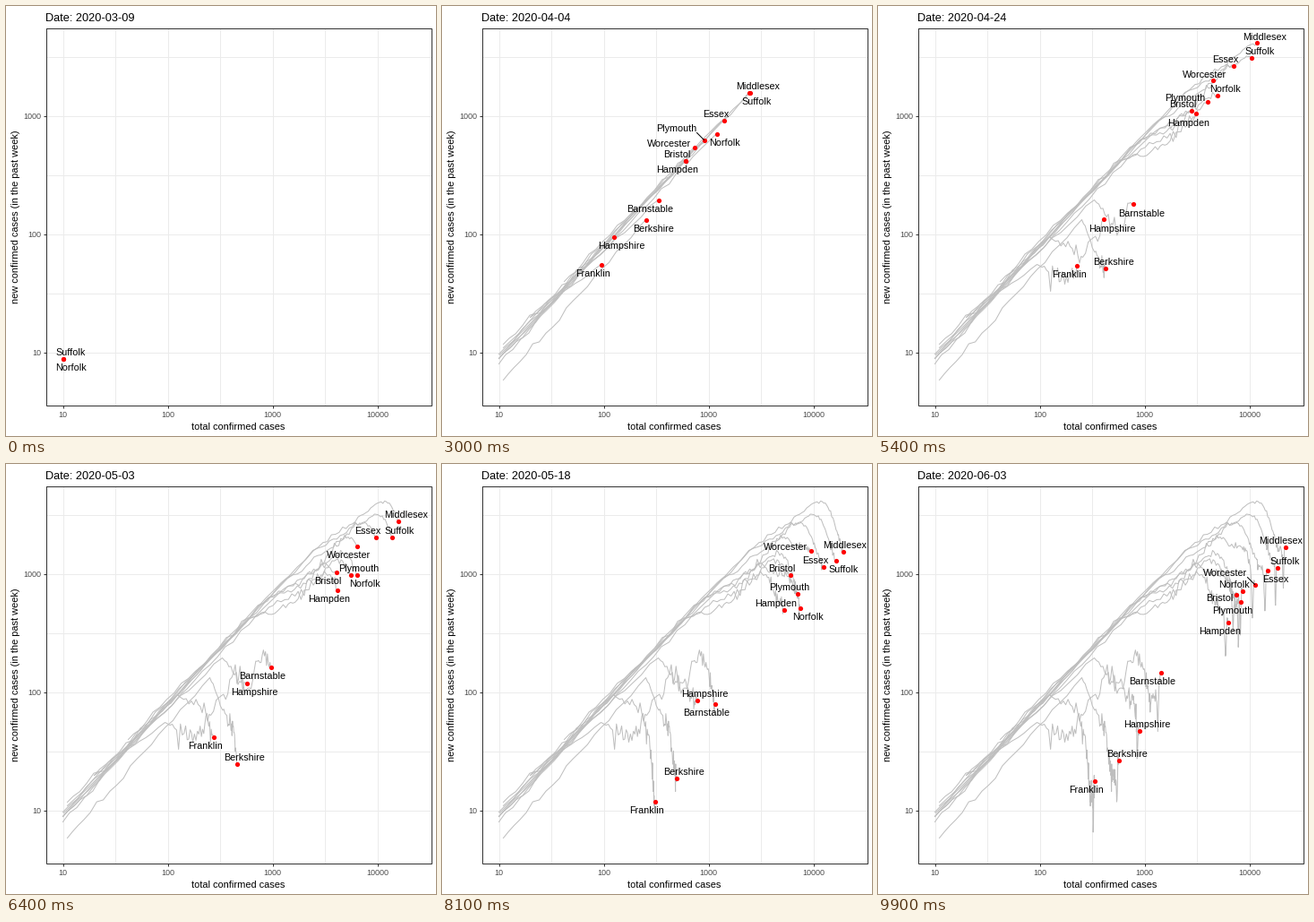
Animation, 480 px wide and 480 px high, one loop 10000 ms. Source, as a matplotlib script:

```python
from itertools import product

import numpy as np
import matplotlib.pyplot as plt
from matplotlib.animation import FuncAnimation

FRAMES, DAYS = 100, 86
KEYS = [30, 45, 64, 81, 99]          # ticks at which each county's place is known
PT = 0.75                            # points per pixel at 96 dpi
FAMILY = "Liberation Sans"

rng = np.random.default_rng(4)
fig = plt.figure(figsize=(5, 5), dpi=96, facecolor="white")
ax = fig.add_axes([0, 0, 1, 1])
ax.set(xlim=(0, 480), ylim=(480, 0))
ax.axis("off")


def text(x, y, s, size, color="black", **kw):
    return ax.text(x, y, s, fontsize=size * PT, family=FAMILY, color=color, **kw)


def rule(xs, ys, color, z=1):
    ax.plot(np.add(xs, .5), np.add(ys, .5), color=color, lw=PT, zorder=z,
            snap=True, solid_capstyle="butt", solid_joinstyle="miter")


def progress(t, start):
    """Steady exponential spread up to the first key, then saturation."""
    p = np.clip((t - start) / (KEYS[0] - start), 0, 1) ** 1.1
    return p + np.where(t > KEYS[0], 1 - np.exp((KEYS[0] - t) / 20.7), 0)


def trajectory(start, points):
    t = np.arange(start, FRAMES)
    known = np.array([start] + KEYS)
    x, y = (np.interp(progress(t, start), progress(known, start), axis)
            for axis in np.transpose(points))
    # spring peak, late drop in reports, and daily scatter between the keys
    y -= 18 * np.sin(np.pi * np.clip((t - 45) / 19, 0, 1))
    y += 45 * np.exp(-((t - 92) / 1.7) ** 2 / 2)
    calm = np.clip(np.abs(t[:, None] - known).min(axis=1) / 2, 0, 1)
    y += calm * rng.normal(0, 1, t.size) * np.where(t < 36, 1.5, y / 40)
    return np.column_stack([x, y])


class County:
    def __init__(self, name, home, start, *points):
        self.start = start
        self.home = (1 if "E" in home else -1, 1 if "S" in home else -1)
        self.path = trajectory(start, points)
        self.trail, = ax.plot([], [], color="#BEBEBE", lw=PT, zorder=2)
        self.dot, = ax.plot([], [], "o", color="red", ms=5.2 * PT, mew=0, zorder=3)
        self.link, = ax.plot([], [], color="black", lw=PT, zorder=3)
        self.label = text(0, 0, name, 10.7, ha="center", va="baseline", zorder=4)
        self.half = self.label.get_window_extent().width / 2

    def candidates(self):
        """Yield (label centre, cost): close by, beside, then further off."""
        for sx, sy in product((1, -1), repeat=2):
            turn = .5 * (sx != self.home[0]) + .5 * (sy != self.home[1])
            for dx, dy, cost in ((9, 8.5 + 1.5 * sy, 0), (self.half + 3, 4, 1.5),
                                 (self.half + 8, 13, 3)):
                spot = self.pos + (sx * dx, sy * dy)
                spot[0] = np.clip(spot[0], 46 + self.half, 473 - self.half)
                yield spot, cost + turn

    def place(self, placed, live):
        def crowding(option):
            spot, cost = option
            for c in placed:
                dx, dy = np.abs(spot - c.spot)
                cost += 10 * (dx < self.half + c.half and dy < 11)
            for c in live:
                dx, dy = np.abs(spot - c.pos)
                cost += 3 * (c is not self and dx < self.half + 2 and dy < 7)
            return cost
        self.spot = min(self.candidates(), key=crowding)[0]

    def draw(self, tick):
        line = self.path[:tick - self.start + 1] + .5
        self.trail.set_data(line[:, 0], line[:, 1])
        self.dot.set_data(line[-1:, 0], line[-1:, 1])
        self.label.set_position((self.spot[0] + .5, self.spot[1] + 4))
        box = np.array([self.half, 5])
        edge = np.clip(self.pos, self.spot - box, self.spot + box)
        far = np.hypot(*(self.pos - edge)) > 7.5
        seg = np.array([edge, self.pos]) + .5 if far else np.empty((0, 2))
        self.link.set_data(seg[:, 0], seg[:, 1])

    def show(self, on):
        for art in (self.trail, self.dot, self.link, self.label):
            art.set_visible(on)


# Panel, grid and axes: a decade is 117 px across and 132 px up
for i in range(7):
    x = 63 + int(58.5 * i)
    rule([x, x], [24, 445], "#EBEBEB")
    if i % 2 == 0:
        rule([x, x], [445, 448], "#333333", 5)
        text(x + .5, 459, 10 ** (i // 2 + 1), 9, "#4D4D4D", ha="center")
for i in range(6):
    y = 386 - 66 * i
    rule([44, 474], [y, y], "#EBEBEB")
    if i % 2 == 0:
        rule([41, 44], [y, y], "#333333", 5)
        text(39.5, y + 4.5, 10 ** (i // 2 + 1), 9, "#4D4D4D", ha="right")
rule([44, 474, 474, 44, 44], [24, 24, 445, 445, 24], "#333333", 5)
text(259, 473, "total confirmed cases", 11, ha="center")
text(16, 235.5, "new confirmed cases (in the past week)", 11, rotation=90,
     ha="right", va="center")
title = text(43.5, 17, "", 12.8)

# Name, preferred label side, first tick, then first place and place at each key
counties = [
    County("Middlesex", "NE", 5, (136, 307),
           (343, 96), (401, 54), (437, 63), (447, 97), (454, 92)),
    County("Suffolk", "NE", 0, (63, 393),
           (342, 96), (397, 65), (430, 81), (439, 107), (445, 115)),
    County("Essex", "NW", 7, (68, 381),
           (314, 127), (374, 85), (412, 81), (425, 114), (434, 118)),
    County("Norfolk", "SE", 0, (63, 393),
           (306, 142), (360, 108), (391, 123), (399, 160), (406, 141)),
    County("Worcester", "NW", 8, (63, 399),
           (281, 157), (348, 118), (391, 91), (411, 96), (420, 134)),
    County("Plymouth", "NW", 10, (63, 393),
           (292, 149), (345, 128), (384, 123), (396, 144), (404, 153)),
    County("Hampden", "SW", 14, (64, 389),
           (271, 172), (335, 140), (369, 140), (381, 162), (390, 176)),
    County("Bristol", "SW", 10, (63, 388),
           (271, 172), (322, 154), (368, 120), (388, 123), (399, 145)),
    County("Barnstable", "SW", 10, (68, 377),
           (241, 216), (269, 250), (295, 226), (304, 267), (315, 232)),
    County("Berkshire", "NE", 9, (68, 417),
           (227, 238), (248, 290), (257, 334), (261, 350), (268, 330)),
    County("Hampshire", "NE", 18, (98, 347),
           (191, 257), (228, 280), (268, 244), (284, 263), (291, 297)),
    County("Franklin", "SW", 18, (98, 347),
           (177, 288), (208, 310), (231, 304), (237, 376), (241, 353)),
]


def update(tick):
    day = int(tick * DAYS / (FRAMES - 1) + 1e-6)
    title.set_text(f"Date: {np.datetime64('2020-03-09') + day}")
    live = [c for c in counties if c.start <= tick]
    for c in counties:
        c.show(c in live)
    for c in live:
        c.pos = c.path[tick - c.start]
    for i, c in enumerate(live):
        c.place(live[:i], live)
        c.draw(tick)
    return []


anim = FuncAnimation(fig, update, frames=FRAMES, interval=100, repeat=True,
                     repeat_delay=0, blit=False)
plt.show()
```
